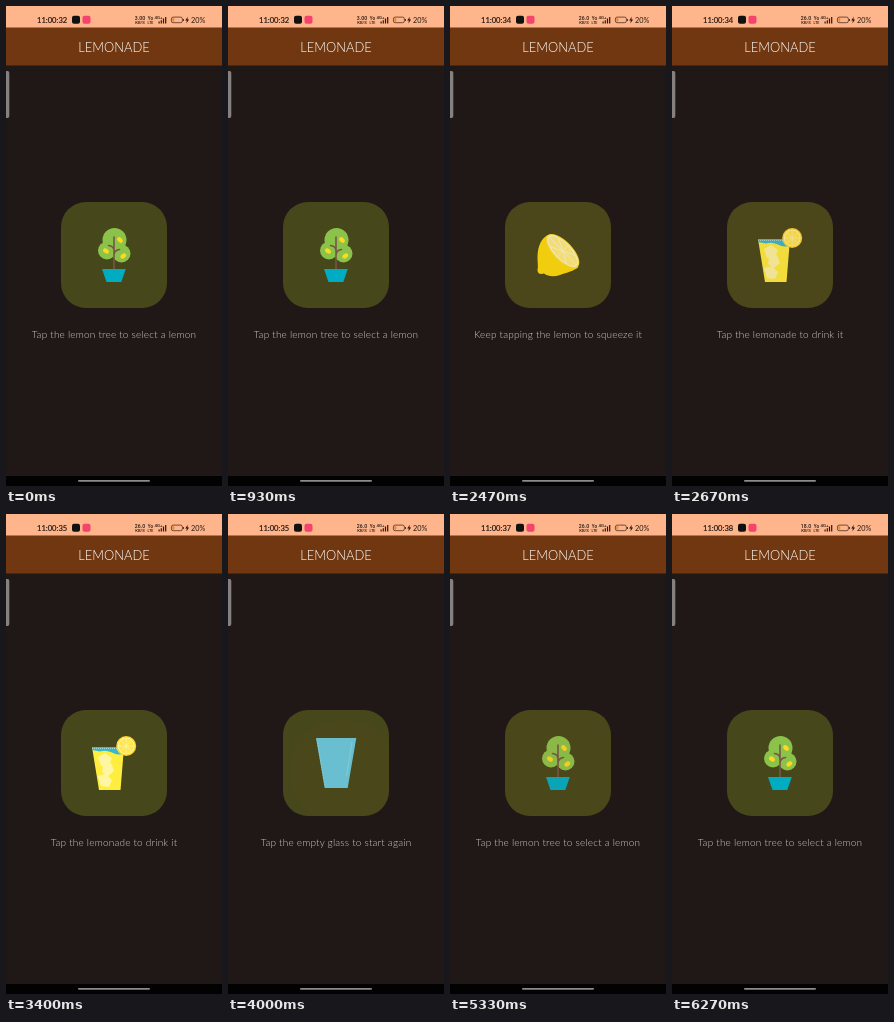
An HTML page for the animation above (7070 ms loop, 216 by 480 pixels).

```html
<!DOCTYPE html>
<html lang="en">
<head>
<meta charset="utf-8">
<title>Lemonade</title>
<style>
  html, body { margin: 0; width: 100%; height: 100%; overflow: hidden; background: #201817; }
  svg { display: block; width: 100vw; height: 100vh; font-family: Lato, sans-serif; }
  .scene { visibility: hidden; }
  .tiny { font-family: Roboto, sans-serif; font-weight: 500; text-anchor: middle; }
  #caption { font-size: 10px; font-weight: 300; letter-spacing: .2px; text-anchor: middle; fill: #d2cac6; }
</style>
</head>
<body>
<svg viewBox="0 0 216 480">
  <defs>
    <clipPath id="button"><rect x="55" y="196" width="106" height="106" rx="25"/></clipPath>
    <clipPath id="drink"><path d="M86 233H118L114.500 276H93Z"/></clipPath>
  </defs>

  <rect width="216" height="480" fill="#201817"/>
  <rect width="216" height="22" fill="#ffb58b"/>
  <rect y="21.500" width="216" height="38" fill="#703710"/>
  <rect y="470" width="216" height="10" fill="#030202"/>
  <rect x="72" y="473.900" width="72" height="1.800" rx=".9" fill="#8c8c8c"/>
  <path d="M0 65H1.500Q3.300 65 3.300 67V110Q3.300 112 1.500 112H0Z" fill="#85817f"/>
  <text x="108" y="46" font-size="12.900" font-weight="300" text-anchor="middle" fill="#fff">LEMONADE</text>

  <!-- status bar -->
  <g fill="#241a15">
    <text id="clock" x="31" y="16.800" font-size="7.600" stroke="#241a15" stroke-width=".2"></text>
    <rect x="66" y="9.800" width="8" height="8" rx="2" fill="#111"/>
    <rect x="76.500" y="9.800" width="8" height="8" rx="2" fill="#f4436c"/>
    <g class="tiny">
      <text id="speed" x="134" y="13.600" font-size="5.200"></text>
      <text x="134" y="17.600" font-size="4.200">KB/S</text>
      <text x="144.500" y="13.600" font-size="4.600">Yo</text>
      <text x="144.500" y="17.600" font-size="3.600">LTE</text>
      <text x="152.500" y="13.400" font-size="4.400">4G+</text>
    </g>
    <path d="M152.500 15.500h1.200v2h-1.200zM154.700 14.300h1.200v3.200h-1.200zM156.900 12.500h1.200v5h-1.200zM159.100 11h1.200v6.500h-1.200z"/>
    <rect x="165.400" y="11.100" width="11" height="5.600" rx="1.800" fill="none" stroke="#4a3328" stroke-width=".8"/>
    <rect x="166.300" y="12" width="2" height="3.800" rx=".8" fill="#e58a2e"/>
    <path d="M177 13h.8v2h-.8zM181.800 10.700l-2.600 3.800h1.700l-.6 3 2.800-4h-1.700z"/>
    <text x="185" y="16.800" font-size="7.300">20%</text>
  </g>

  <rect x="55" y="196" width="106" height="106" rx="25" fill="#46481b"/>

  <g class="scene">
    <g fill="#8bc34a">
      <circle cx="108.500" cy="234" r="12"/>
      <circle cx="101" cy="244.500" r="9"/>
      <circle cx="115.500" cy="247.500" r="9"/>
    </g>
    <path d="M108 231V264M108 244.500Q107.500 240 102.500 239.500M108 249Q108.500 244 113.500 243.500" fill="none" stroke="#795548" stroke-width="1.600" stroke-linecap="round"/>
    <g fill="#fdd91f">
      <ellipse cx="114" cy="234" rx="3.200" ry="2.200" transform="rotate(45 114 234)"/>
      <ellipse cx="100" cy="245" rx="3.200" ry="2.200" transform="rotate(35 100 245)"/>
      <ellipse cx="117.300" cy="250" rx="3.200" ry="2.200" transform="rotate(-40 117.300 250)"/>
    </g>
    <path d="M96 263H119.800L115.300 276H100.500Z" fill="#00acc1"/>
  </g>

  <g class="scene">
    <path d="M97.500 229C91 233 88 240 87.500 250C87.300 256 88.500 260 87.500 264C87.500 267.500 90 268.700 94 267.500C98 270.500 104 271 110 269C117 266.500 124 265 128.500 261Z" fill="#ffdd0d"/>
    <g transform="translate(112.700 245) rotate(46)">
      <ellipse rx="21.800" ry="9.600" fill="#ffe53b"/>
      <ellipse rx="20.500" ry="8.500" fill="#fff9cf"/>
      <ellipse rx="19.200" ry="7.400" fill="#ffee80"/>
      <path d="M-19 0H19M0-7.500V7.500M-12-6L12 6M-12 6L12-6" stroke="#fff9cf" stroke-width=".8"/>
    </g>
  </g>

  <g class="scene">
    <path d="M86 233H118L114.500 276H93Z" fill="#ffee3f"/>
    <g clip-path="url(#drink)">
      <path d="M85 232H119V239Q112 242 106 238.500Q99 235.500 94 237.500L86 236Z" fill="#35b9d0"/>
      <path d="M86 234.400H112" stroke="#a7dce0" stroke-width="1" stroke-dasharray="1 1"/>
      <path d="M92 243l7-4 7 5-3 7-8 1zM97 251l8-2 3 8-6 5-6-4zM92 262l8-2 6 6-3 7-8-1z" fill="#fff6a4"/>
    </g>
    <circle cx="120.200" cy="232" r="10" fill="#fdd52c"/>
    <circle cx="120.200" cy="232" r="8.500" fill="#fff3a0"/>
    <circle cx="120.200" cy="232" r="7.400" fill="#ffe64c"/>
    <path d="M112.800 232h14.800M120.200 224.600v14.800M115 226.800l10.400 10.400M115 237.200l10.400-10.400" stroke="#fff3a0" stroke-width=".8"/>
  </g>

  <g class="scene">
    <path d="M88 224H128.300L119.700 274H96.700Z" fill="#67cbdf"/>
    <path d="M89 225.500L97.300 273" stroke="#94dce8" stroke-width=".8" stroke-dasharray="1.500 1.500"/>
    <path d="M124 228L118.500 262" stroke="#86d7e5" stroke-width="1"/>
  </g>

  <g clip-path="url(#button)"><circle id="ripple" cx="115.500" cy="258.500" fill="#7a3b20"/></g>
  <circle id="touch" cx="115.500" cy="258.500" r="6.300" fill="#d6e4e0" fill-opacity=".82" stroke="#9fc4c8" stroke-width=".7" stroke-opacity=".7"/>
  <text id="caption" x="108" y="331.500"></text>
</svg>
<script>
  const LOOP = 7070;
  const captions = [
    "Tap the lemon tree to select a lemon",
    "Keep tapping the lemon to squeeze it",
    "Tap the lemonade to drink it",
    "Tap the empty glass to start again"
  ];
  // finger down, finger up, scene shown afterwards
  const taps = [
    [1000, 1130, 1], [1930, 2000, 1], [2270, 2370, 1],
    [2510, 2590, 2], [3865, 3960, 3], [5065, 5190, 0]
  ];
  const $ = id => document.getElementById(id);
  const scenes = document.querySelectorAll(".scene");
  const clamp = x => Math.max(0, Math.min(1, x));

  function draw(t) {
    const last = taps.filter(([, up]) => t >= up).pop();
    const scene = last ? last[2] : 0;
    scenes.forEach((el, i) => el.style.visibility = i === scene ? "visible" : "hidden");
    $("caption").textContent = captions[scene];

    const pressed = taps.some(([down, up]) => t >= down && t < up);
    $("touch").style.visibility = pressed ? "visible" : "hidden";

    const age = last ? t - last[1] : 1000;
    $("ripple").setAttribute("r", 20 + 80 * clamp(age / 100));
    $("ripple").setAttribute("opacity", .1 * clamp(age / 50) * clamp((220 - age) / 110));

    const second = 32 + Math.max(0, Math.floor((t - 265) / 1000));
    $("clock").textContent = "11:00:" + second;
    $("speed").textContent = t < 1265 ? "3.00" : t < 5870 ? "26.0" : "18.0";
  }

  function tick() {
    draw(performance.now() % LOOP);
    requestAnimationFrame(tick);
  }
  tick();
</script>
</body>
</html>
```
